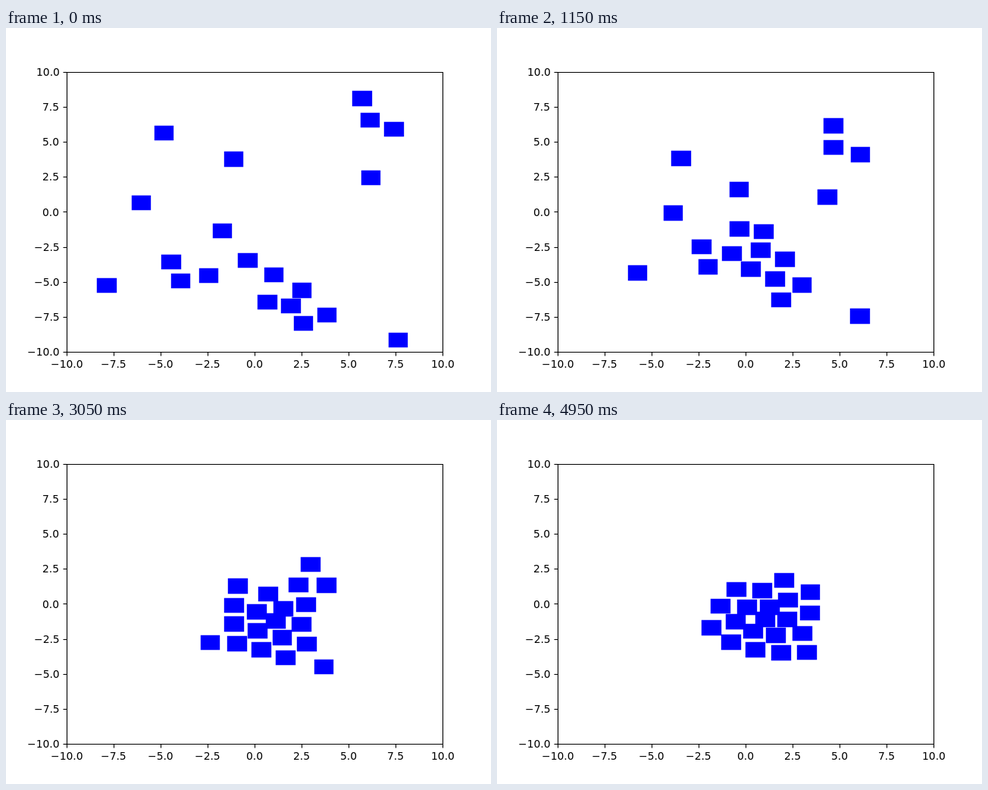
Animation, 640 px wide and 480 px high, one loop 5 s. Source, as an HTML page with a canvas:

```html
<!DOCTYPE html>
<html lang="en">
<head>
<meta charset="utf-8">
<title>Swarm gathering</title>
<style>
  html, body { margin: 0; width: 100%; height: 100%; overflow: hidden; background: #fff; }
  canvas { display: block; }
</style>
</head>
<body>
<canvas id="stage" width="640" height="480"></canvas>
<script>
const ctx = document.getElementById("stage").getContext("2d");
const STEP_MS = 50, STEPS = 100;
const plot = { left: 80, top: 57.6, width: 496, height: 369.6 };

// Every square heads for the common centre and pushes away close neighbours.
const SPEED = 0.1, SPACING = 1.55, PUSH = 0.35, SUBSTEPS = 2;
const start = [
  [5.69, 8.12], [6.13, 6.57], [7.39, 5.92], [6.17, 2.46], [-4.84, 5.65],
  [-1.13, 3.79], [-6.05, 0.67], [-1.73, -1.33], [-4.44, -3.55], [-3.95, -4.9],
  [-2.46, -4.52], [-7.89, -5.23], [-0.39, -3.44], [1.01, -4.47], [2.5, -5.57],
  [0.65, -6.42], [1.9, -6.69], [2.58, -7.93], [3.83, -7.34], [7.62, -9.11]
];

function advance(swarm, dt) {
  const mean = axis => swarm.reduce((sum, p) => sum + p[axis], 0) / swarm.length;
  const cx = mean(0), cy = mean(1);
  return swarm.map(([x, y]) => {
    const reach = Math.max(Math.hypot(cx - x, cy - y), SPEED);
    let vx = SPEED * (cx - x) / reach, vy = SPEED * (cy - y) / reach;
    for (const [ox, oy] of swarm) {
      const gap = Math.hypot(x - ox, y - oy);
      if (gap === 0 || gap >= SPACING) continue;
      const force = PUSH * (SPACING - gap) / gap;
      vx += force * (x - ox);
      vy += force * (y - oy);
    }
    return [x + vx * dt, y + vy * dt];
  });
}

const poses = [start];
while (poses.length < STEPS) {
  let swarm = poses[poses.length - 1];
  for (let i = 0; i < SUBSTEPS; i++) swarm = advance(swarm, 1 / SUBSTEPS);
  poses.push(swarm);
}

const toX = x => plot.left + plot.width * (x + 10) / 20;
const toY = y => plot.top + plot.height * (10 - y) / 20;
const snap = v => Math.floor(v + 0.5) + 0.5;

function box(x0, y0, x1, y1) {
  ctx.beginPath();
  ctx.rect(snap(x0), snap(y0), snap(x1) - snap(x0), snap(y1) - snap(y0));
}

function line(x0, y0, x1, y1) {
  ctx.beginPath();
  ctx.moveTo(x0, y0);
  ctx.lineTo(x1, y1);
  ctx.stroke();
}

function drawSquare([x, y]) {
  box(toX(x - 0.5), toY(y + 0.5), toX(x + 0.5), toY(y - 0.5));
  ctx.fill();
  ctx.stroke();
}

function drawAxes() {
  ctx.strokeStyle = ctx.fillStyle = "#000";
  ctx.lineWidth = 1.11;
  ctx.font = '13.89px "DejaVu Sans", sans-serif';
  const left = snap(toX(-10)), bottom = snap(toY(-10));
  box(toX(-10), toY(10), toX(10), toY(-10));
  ctx.stroke();
  for (let value = -10; value <= 10; value += 2.5) {
    const label = value.toFixed(1).replace("-", "\u2212");
    const width = ctx.measureText(label).width;
    const x = toX(value), y = toY(value);
    line(snap(x), bottom, snap(x), bottom + 5);
    line(left - 5, snap(y), left, snap(y));
    ctx.fillText(label, Math.round(x - width / 2 + 0.25), 448);
    ctx.fillText(label, Math.round(plot.left - 9.5 - width), Math.round(y + 5.2));
  }
}

function draw(now) {
  ctx.fillStyle = "#fff";
  ctx.fillRect(0, 0, 640, 480);
  ctx.fillStyle = ctx.strokeStyle = "#00f";
  ctx.lineWidth = 1.39;
  poses[Math.floor(now / STEP_MS) % STEPS].forEach(drawSquare);
  drawAxes();
}

const begin = performance.now();
function tick() {
  draw(performance.now() - begin);
  requestAnimationFrame(tick);
}
tick();
</script>
</body>
</html>
```
